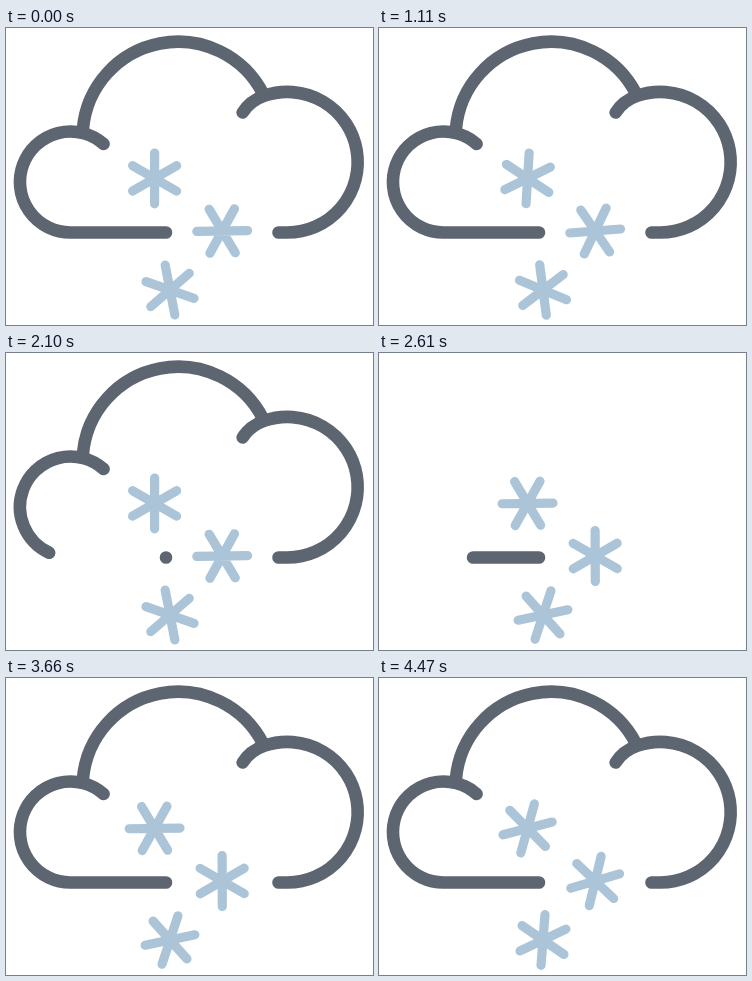
Write an HTML page that moves like this. It is 367x297 px and loops after 4.5 s.

```html
<!DOCTYPE html>
<html lang="en">
<head>
<meta charset="utf-8">
<title>Snow cloud</title>
<style>
  html, body { margin: 0; width: 100%; height: 100%; overflow: hidden; background: #fff; }
  svg { display: block; width: 100%; height: 100%; }
  path { fill: none; stroke-linecap: round; }
  #cloud { stroke: #5c6570; stroke-width: 12.6; }
  #snow { stroke: #abc4d8; stroke-width: 9.2; }
</style>
</head>
<body>
<svg viewBox="0 0 367 297">
  <g id="cloud">
    <path d="M160 204.5H64.7A50.5 50.5 0 1 1 97.6 115.9"/>
    <path d="M76.9 101A95.5 95.5 0 0 1 257.2 66"/>
    <path d="M236.7 84.5Q244 72.8 258 67.9A70.3 70.3 0 1 1 281.2 204.5H272.5"/>
  </g>
  <g id="snow"></g>
</svg>
<script>
const LOOP = 4500;
const SPIN = 60 / 1050; // degrees per ms
const ERASE = 1971, REDRAW = 2516, DONE = 3061;

const flakes = [
  { x: 148.6, y: 150.4, start: 0, dir: 1 },
  { x: 216.2, y: 203, start: 29, dir: -1 },
  { x: 164, y: 262, start: -11, dir: 1 }
];

const snow = document.getElementById('snow');
for (const f of flakes) {
  f.el = document.createElementNS('http://www.w3.org/2000/svg', 'path');
  f.el.setAttribute('d', 'M0-25.4V25.4M-22-12.7L22 12.7M-22 12.7L22-12.7');
  snow.append(f.el);
}

const strokes = [...document.querySelectorAll('#cloud path')].map(el => ({ el, len: el.getTotalLength() }));
const total = strokes.reduce((sum, s) => sum + s.len, 0);

const clamp = (v, lo, hi) => Math.min(hi, Math.max(lo, v));

function ease(t, from, to) {
  const u = clamp((t - from) / (to - from), 0, 1);
  return u * u * (3 - 2 * u);
}

// Shows the part of the cloud between two distances along its joined strokes.
function trim(from, to) {
  let pos = 0;
  for (const { el, len } of strokes) {
    const a = clamp(from - pos, 0, len);
    const b = clamp(to - pos, 0, len);
    el.style.display = b - a > 0.01 ? '' : 'none';
    el.setAttribute('stroke-dasharray', b - a >= len ? 'none' : `0 ${a} ${b - a} ${len + 20}`);
    pos += len;
  }
}

function draw(t) {
  for (const f of flakes) {
    const angle = f.start + f.dir * SPIN * t;
    f.el.setAttribute('transform', `translate(${f.x} ${f.y}) rotate(${angle})`);
  }
  if (t < REDRAW) trim(total * ease(t, ERASE, REDRAW), total);
  else trim(0, total * ease(t, REDRAW, DONE));
}

const begin = performance.now();
function tick() {
  draw((performance.now() - begin) % LOOP);
  requestAnimationFrame(tick);
}
tick();
</script>
</body>
</html>
```
